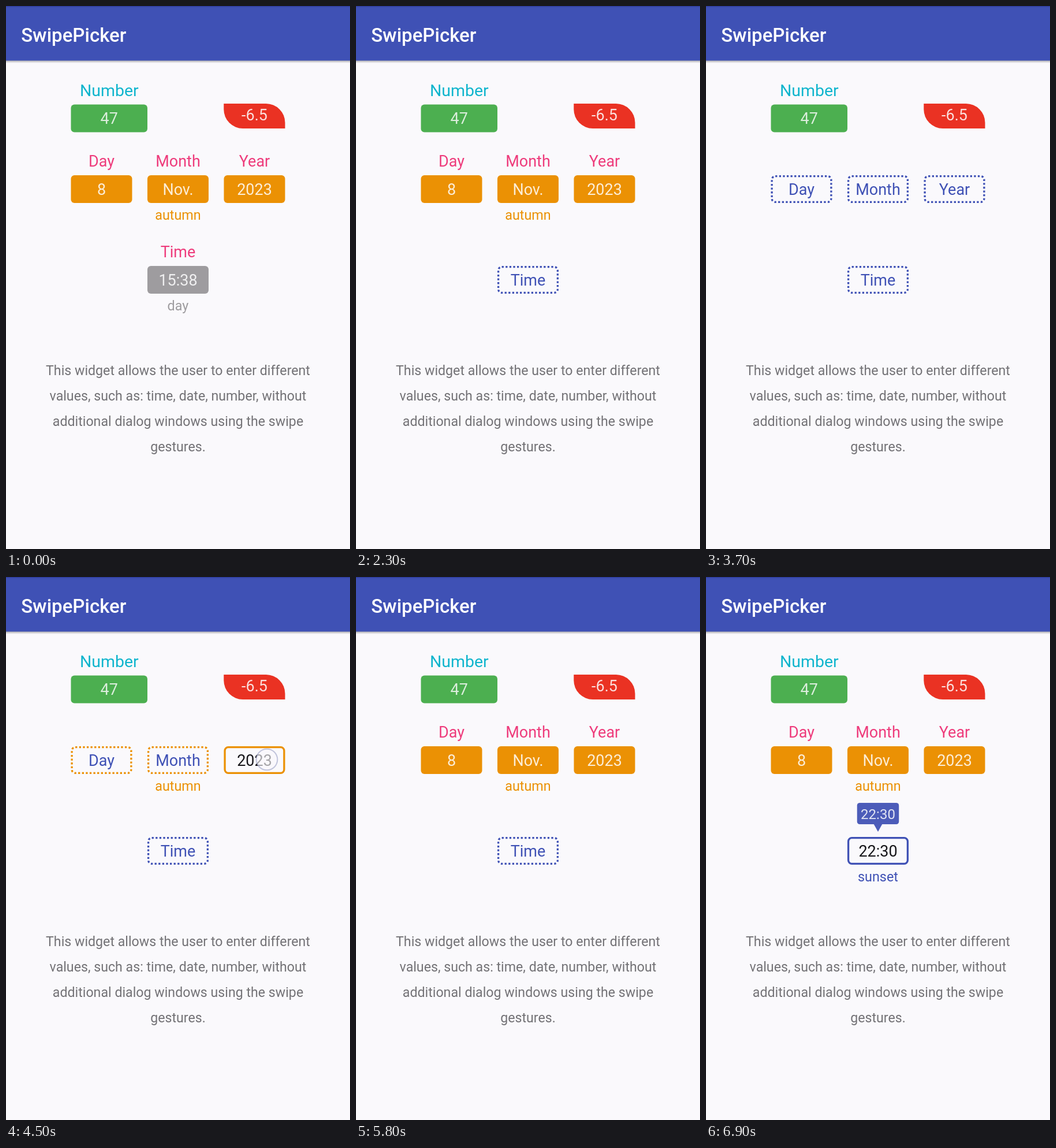
Animation, 596 px wide and 940 px high, one loop 7000 ms. Source, as an HTML page:

```html
<!DOCTYPE html>
<html lang="en">
<head>
<meta charset="utf-8">
<title>SwipePicker</title>
<style>
  html, body { margin: 0; width: 100%; height: 100%; overflow: hidden; background: #faf9fc; }
  svg { display: block; font-family: Roboto, sans-serif; }
  text { text-anchor: middle; }
  .title { text-anchor: start; font-size: 33px; font-weight: 500; fill: #fff; }
  .name { font-size: 27px; }
  .note { font-size: 23.4px; }
  .tip { font-size: 24px; }
  .body { font-size: 23.18px; fill: #737276; }
</style>
</head>
<body>
<svg width="596" height="940" viewBox="0 0 596 940">
  <defs>
    <linearGradient id="shade" x2="0" y2="1">
      <stop offset="0" stop-color="#000" stop-opacity=".32"/>
      <stop offset="1" stop-color="#000" stop-opacity="0"/>
    </linearGradient>
  </defs>
  <rect width="596" height="940" fill="#faf9fc"/>
  <rect y="94" width="596" height="5" fill="url(#shade)"/>
  <rect width="596" height="94.5" fill="#3f51b5"/>
  <rect width="596" height="1.5" fill="#303f9f"/>
  <text class="title" x="26.2" y="61.5">SwipePicker</text>

  <text x="178.8" y="156" font-size="28.5" fill="#0fb5cd">Number</text>
  <rect x="112.5" y="170.5" width="132.5" height="48" rx="6" fill="#4caf50"/>
  <text class="name" x="178.8" y="204" fill="#dceedd">47</text>
  <path d="M377.3 169H450.5A33 33 0 0 1 483.5 202V212H410.3A33 33 0 0 1 377.3 179Z" fill="#ea3223"/>
  <text class="name" x="430.5" y="197.5" fill="#fbdedc">-6.5</text>

  <g class="body">
    <text x="298" y="639">This widget allows the user to enter different</text>
    <text x="298" y="683">values, such as: time, date, number, without</text>
    <text x="298" y="727">additional dialog windows using the swipe</text>
    <text x="298" y="771">gestures.</text>
  </g>
  <g id="scene"></g>
</svg>
<script>
const LOOP = 7000, STEP = 100;
const PINK = '#ee3c7c', INDIGO = '#3f51b5', ORANGE = '#eb9104', GREY = '#9e9c9f';
const scene = document.getElementById('scene');

const clamp = v => Math.min(1, Math.max(0, v));
const ramp = (t, from, to) => clamp((t - from) / (to - from));
const ease = p => (1 - Math.cos(Math.PI * p)) / 2;
const during = (t, from, to) => t >= from && t < to;

const label = (cls, x, y, fill, str) =>
  `<text class="${cls}" x="${x}" y="${y}" fill="${fill}">${str}</text>`;

function frame(x, y, color, dotted) {
  const dash = dotted ? ' stroke-dasharray="3.3 3.3"' : '';
  return `<rect x="${x - 51.4}" y="${y + 1.65}" width="102.8" height="44.7" rx="6"
    fill="none" stroke="${color}" stroke-width="3.3"${dash}/>`;
}

// One picker; drop is 0 with its label above the box, 1 with it inside.
function picker(x, y, name, value, mode, color, drop) {
  if (mode === 'press') return frame(x, y, color) + label('name', x, y + 34, '#17161a', value);
  if (mode === 'empty')
    return frame(x, y, color, true) + label('name', x, y - 15 + 49 * drop, INDIGO, name);
  return label('name', x, y - 15, PINK, name) +
    `<rect x="${x - 53}" y="${y}" width="106" height="48" rx="6" fill="${color}"/>` +
    label('name', x, y + 34, 'rgba(255,255,255,.84)', value);
}

function bubble(x, y, width, value, color, alpha) {
  if (!alpha) return '';
  const top = y - 59;
  return `<g opacity="${alpha}">
    <rect x="${x - width / 2}" y="${top}" width="${width}" height="37" rx="4.5" fill="${color}"/>
    <path d="M${x - 7.5} ${top + 36.5}h15l-7.5 13.5z" fill="${color}"/>
    ${label('tip', x, top + 27.6, 'rgba(255,255,255,.84)', value)}</g>`;
}

const touch = (x, y) =>
  `<circle cx="${x}" cy="${y}" r="18.3" fill="#faf9fc" fill-opacity=".63"
    stroke="#a4a8cb" stroke-opacity=".65" stroke-width="2"/>`;

function dates(t) {
  const cleared = during(t, 2800, 4900);
  const drop = t < 4500 ? ease(ramp(t, 2800, 3200)) : 1 - ease(ramp(t, 4500, 4900));
  const color = during(t, 2800, 4400) ? INDIGO : ORANGE;
  const side = cleared ? 'empty' : 'full';
  const month = during(t, 2400, 2800) ? 'press' : side;
  const year = during(t, 4400, 5600) ? 'press' : side;
  const tip = ramp(t, 4500, 4800) - ramp(t, 5300, 5600);
  return picker(165.5, 293, 'Day', '8', side, color, drop) +
    picker(298, 293, 'Month', 'Nov.', month, color, drop) +
    picker(430.5, 293, 'Year', '2023', year, color, drop) +
    (color === ORANGE ? label('note', 298, 369.5, ORANGE, 'autumn') : '') +
    bubble(430.5, 293, 66.5, '2023', ORANGE, tip);
}

function clock(t) {
  const swiping = t >= 6100;
  const mins = swiping ? 1125 + (t - 6400) / 100 * 45 : 938;
  const value = Math.floor(mins / 60) + ':' + String(mins % 60).padStart(2, '0');
  const late = mins >= 1200;
  const empty = during(t, 1600, 6100);
  const mode = empty ? 'empty' : t < 1300 ? 'full' : 'press';
  const color = empty || late ? INDIGO : GREY;
  const tip = .45 * ramp(t, 6300, 6400) + .55 * ramp(t, 6400, 6600) - .07 * ramp(t, 6800, 6900);
  return picker(298, 450, 'Time', value, mode, color, ease(ramp(t, 1600, 2000))) +
    (empty ? '' : label('note', 298, 526.5, color, late ? 'sunset' : 'day')) +
    bubble(298, 450, 72.5, value, color, tip);
}

function finger(t) {
  if (during(t, 1300, 1800)) return touch(312, 478);
  if (during(t, 2400, 3000)) return touch(321, 333);
  if (during(t, 4300, 5400)) return touch(452, 316);
  if (during(t, 6000, 6700)) return touch(312 + 187 * ease(ramp(t, 6000, 6400)), 470);
  return '';
}

let last = -1;
function draw() {
  const t = Math.floor(performance.now() % LOOP / STEP) * STEP;
  if (t !== last) {
    scene.innerHTML = dates(t) + clock(t) + finger(t);
    last = t;
  }
  requestAnimationFrame(draw);
}
draw();
</script>
</body>
</html>
```
